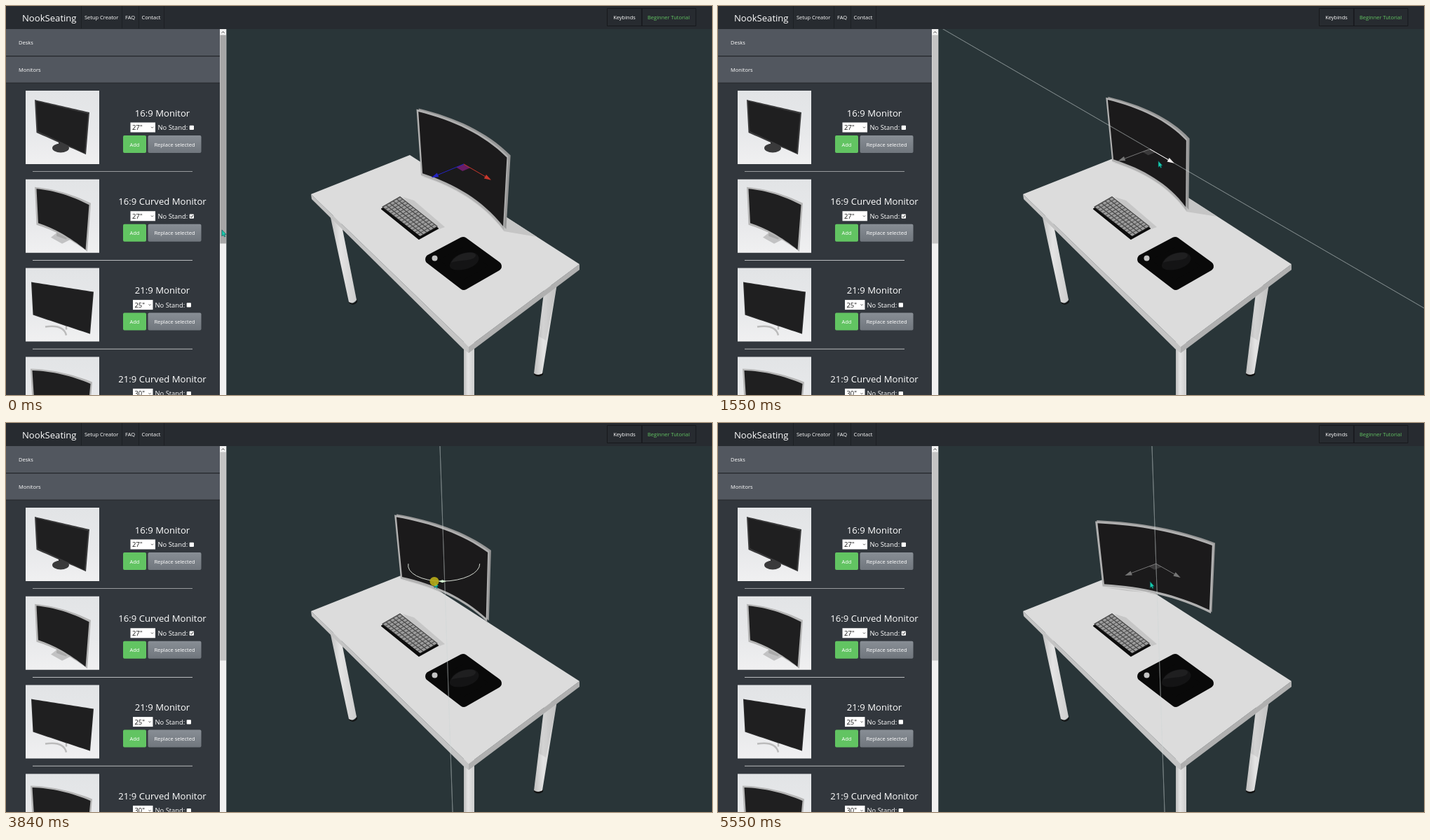
Write an HTML page that moves like this. It is 1007 px wide and 556 px high and loops after 6900 ms.

```html
<!DOCTYPE html>
<html lang="en">
<head>
<meta charset="utf-8">
<title>Desk planner</title>
<style>
html, body { margin: 0; width: 100%; height: 100%; overflow: hidden; background: #293538; }
svg { display: block; width: 1007px; height: 556px; font: 7.5px 'Open Sans', 'Noto Sans', sans-serif; fill: #fff; }
.mid { text-anchor: middle; }
.title { font-size: 13.1px; }
.field { font-size: 9.4px; }
</style>
</head>
<body>
<svg viewBox="0 0 1007 556">
  <defs>
    <linearGradient id="grey" x2="0" y2="1"><stop stop-color="#888e95"/><stop offset="1" stop-color="#70767d"/></linearGradient>
    <linearGradient id="leg"><stop stop-color="#bdbdbd"/><stop offset=".4" stop-color="#e4e4e4"/><stop offset="1" stop-color="#cdcdcd"/></linearGradient>
    <linearGradient id="photo" x2="0" y2="1"><stop stop-color="#e2e4e6"/><stop offset=".6" stop-color="#e8e9eb"/><stop offset="1" stop-color="#f0f0f1"/></linearGradient>
    <clipPath id="deskTop"><path d="M435,269 576,213 818,369 660,487Z"/></clipPath>
  </defs>

  <!-- 3D view -->
  <path fill="#293538" d="M314 33h693v523H314z"/>
  <path fill="#111" d="M489,420q6,10 12,0v3q-6,7-12,1zM753,523q6,7 13,1v3q-7,5-13,0z"/>
  <path fill="url(#leg)" d="M462,298 477,304 500,420q-5,7-11,3Z"/>
  <path fill="url(#leg)" d="M768,402 786,397 765,525q-6,4-12,0Z"/>
  <path fill="#8e8e8e" opacity=".2" d="M768,402 786,397 770,478 760,472Z"/>
  <path fill="url(#leg)" d="M653 480h15v76h-15z"/>
  <path fill="#c4c4c4" d="M435,269 660,487 660,496 652,490 436,276Z"/>
  <path fill="#b0b0b0" d="M660,487 818,369v8L668,490l-8,6Z"/>
  <path fill="#dcdcdc" d="M435,269 576,213 818,369 660,487Z"/>
  <path id="shadow" fill="#c5c5c5" clip-path="url(#deskTop)"/>

  <path fill="#c6c6c6" d="M566,273 582,278 626,316 612,321Z"/>
  <path fill="#0d0d0d" stroke="#0d0d0d" stroke-width="2" stroke-linejoin="round" d="M536,290 561,275 616,318 589,333Z"/>
  <path fill="#4b4b4b" d="M536,287 562,272 616,315 591,329Z"/>
  <g id="keys" fill="#9d9d9d" transform="matrix(53 42 -25 14.5 562 273)"/>

  <path fill="#090909" stroke="#090909" stroke-width="14" stroke-linejoin="round" d="M605,362 652,337 700,372 653,399Z"/>
  <circle cx="611.5" cy="360.5" r="4" fill="#c4c4c4"/>
  <path fill="#141415" d="M633,372C633,361 648,351 664,352C674,353 678,361 671,368C662,378 635,381 633,372Z"/>
  <path fill="#1f1f20" d="M635,367C639,358 651,352 664,352.5C671,353 672,358 666,361C656,365 643,363 635,367Z"/>

  <path id="back" fill="#969696"/><path id="front" fill="#b0b0b0"/><path id="screen" fill="#1b1a1b"/>
  <path id="axis" stroke="#cfd6d6" stroke-width=".8" opacity=".5"/>
  <g id="move"><path id="plane"/><g id="zArm"/><g id="xArm"/></g>
  <g id="turn"><path id="ring" fill="none"/><path id="knob" d="M-5.5,0 0,-2 5.5,0 0,2Z"/></g>

  <!-- Side panel -->
  <path fill="#32373d" d="M0 33h305v523H0z"/>
  <path fill="#52575f" d="M0 33h305v38H0zM0 72h305v38H0z"/>
  <path fill="#24272b" d="M0 71h305v1.2H0zM0 109.6h305v.8H0z"/>
  <text x="18" y="55">Desks</text><text x="18" y="94">Monitors</text>
  <g id="list"></g>
  <path fill="#f1f1f1" d="M305 33h9.3v523h-9.3z"/>
  <path id="thumb" d="M305.4 41.5h8.5v298h-8.5z"/>
  <path fill="none" stroke="#444" d="M307.6 38.6l2-2 2 2"/>

  <!-- Top bar -->
  <path fill="#272b30" d="M0 0h1007v33H0z"/>
  <path stroke="#1d2024" d="M107.5 0v32M165.5 0v32M189.5 0v32M225.5 0v32"/>
  <path fill="none" stroke="#17191c" d="M857.5 3.5h49.5v25h-49.5zM907 3.5h77v25h-77z"/>
  <text x="23" y="21.5" class="title">NookSeating</text>
  <text x="112" y="19">Setup Creator</text><text x="170" y="19">FAQ</text><text x="193.5" y="19">Contact</text>
  <text x="882" y="19" class="mid">Keybinds</text>
  <text x="945" y="19" class="mid" fill="#62c462">Beginner Tutorial</text>

  <g id="cursor">
    <path fill="#17cbae" stroke="#0b4a48" stroke-width=".6" d="M0,0V9L2,7.3 3.5,10 4.9,9.4 3.5,6.8 6,6.5Z"/>
    <circle id="press" r="6.5" fill="#b9ac18" opacity=".9"/>
  </g>
</svg>
<script>
const $ = id => document.getElementById(id);
const set = (id, attrs) => { for (const k in attrs) $(id).setAttribute(k, attrs[k]); };
const show = (id, on) => set(id, { display: on ? 'inline' : 'none' });
const ramp = (t, a, b) => Math.min(1, Math.max(0, (t - a) / (b - a)));
const within = (t, a, b) => t >= a && t < b;
const span = (from, to, n = 16) => Array.from({ length: n + 1 }, (_, i) => from + (to - from) * i / n);
const poly = points => 'M' + points.map(p => p.map(v => v.toFixed(2))).join(' ') + 'Z';

// Closed band between an upper and a lower curve
const band = (xs, upper, lower) => poly([...xs.map(upper), ...xs.toReversed().map(lower)]);

// Camera looking down on the desk; heights count from the desk top, in cm
const rad = deg => deg * Math.PI / 180;
const focal = 654, pitch = rad(35.2), eye = 122.7, deskAngle = 49.5;
function project(right, height, ahead) {
  const up = height - eye, s = Math.sin(pitch), c = Math.cos(pitch), k = focal / (ahead * c - up * s);
  return [660 + right * k, 294 - (up * c + ahead * s) * k];
}

// Point relative to an object standing at [right, ahead], turned by deg
function local([right, ahead], deg, x, y, z) {
  const s = Math.sin(rad(deg)), c = Math.cos(rad(deg));
  return project(right + x * c - z * s, y, ahead - x * s - z * c);
}

// Product list: thumbnails are slanted panels whose right side is nearer
const products = [
  { name: '16:9 Monitor', size: 27, frame: '#3a3a3b', edge: 2, wide: 1,
    left: 13, right: 91, top: 13, drop: 18, tall: 47, bulge: 0,
    stand: '<path fill="#333" d="M47 70h8v13h-8z"/><ellipse cx="50" cy="82" rx="12" ry="6.5" fill="#3a3a3b"/>' },
  { name: '16:9 Curved Monitor', size: 27, frame: '#b5b5b5', edge: 2.5, wide: 1, checked: 1,
    left: 13, right: 93, top: 11, drop: 23, tall: 54, bulge: 4,
    stand: '<path fill="#c2c2c3" d="M36 83l10-8 22 9-16 8z"/><path fill="#aaa" d="M45 72l16 6-3 8-14-5z"/>' },
  { name: '21:9 Monitor', size: 25, frame: '#2c2c2d', edge: 1,
    left: 8, right: 97, top: 20, drop: 14, tall: 47, bulge: 0,
    stand: '<path fill="none" stroke="#bbb" stroke-width="2.5" d="M28 84q26-4 30 12M58 78v10"/>' },
  { name: '21:9 Curved Monitor', size: 30, frame: '#b5b5b5', edge: 2.5,
    left: 7, right: 95, top: 17, drop: 19, tall: 45, bulge: 4, stand: '' }
];
function thumbPanel(p, inset) {
  const rise = u => p.top + p.drop * u - p.bulge * 4 * u * (1 - u);
  const x = (u, taper) => p.left + inset + taper + (p.right - p.left - 2 * inset - 3 * taper) * u;
  return band(span(0, 1), u => [x(u, 0), rise(u) + inset],
    u => [x(u, 2.5), rise(u) + p.tall * (1 + .28 * u) - inset]);
}
$('list').innerHTML = products.map((p, i) => {
  const sx = p.wide ? 177.5 : 181, sw = p.wide ? 35.5 : 28.5, label = p.wide ? 216.5 : 212.5;
  return `<g transform="translate(0 ${121 + i * 126.8})">
    <path fill="url(#photo)" d="M28 0h105v105H28z"/>
    <g transform="translate(28)">${p.stand}
      <path fill="${p.frame}" d="${thumbPanel(p, 0)}"/><path fill="#1f1f20" d="${thumbPanel(p, p.edge)}"/></g>
    <path fill="#b9bbbd" d="M38 115.2h228v.9H38z"/>
    <text x="223" y="36.7" class="mid title">${p.name}</text>
    <path fill="#fff" d="M${sx} 45.5h${sw}v14h-${sw}z"/>
    <text x="${sx + 2.5}" y="56" class="field" fill="#111">${p.size}"</text>
    <path fill="none" stroke="#333" stroke-width=".8" d="M${sx + sw - 6} 51.8l1.5 1.5 1.5-1.5"/>
    <text x="${label}" y="56" class="field">No Stand:</text>
    <rect x="${label + 45.2}" y="49.7" width="6.3" height="6.3" rx="1"/>
    ${p.checked ? '<path fill="none" stroke="#222" d="M263 52.8l1.5 1.6 2.6-3.3"/>' : ''}
    <rect x="167" y="64" width="33" height="25" rx="2" fill="#62c462"/>
    <rect x="202.5" y="64" width="76" height="25" rx="2" fill="url(#grey)"/>
    <text x="183.5" y="79.5" class="mid">Add</text><text x="240.5" y="79.5" class="mid">Replace selected</text>
  </g>`;
}).join('');

$('keys').innerHTML = span(0, 69, 69).map(i =>
  `<rect x="${i % 14 / 14 + .01}" y="${Math.floor(i / 14) / 5 + .02}" width=".056" height=".15"/>`).join('');

// Pointer moves relative to the gizmo: start, end, then offset reached
const pointerMoves = [
  [30, 570, 30, 17], [1480, 1550, 12, 17], [1610, 1790, -36, 18], [2590, 2880, -25, 28],
  [3060, 3290, -16.5, 25], [3720, 4130, -7.5, 26], [5010, 5140, -8.5, 25.5]
];
function pointerOffset(t) {
  let x = -345, y = 94;
  for (const [a, b, dx, dy] of pointerMoves) {
    const f = ramp(t, a, b);
    x += (dx - x) * f;
    y += (dy - y) * f;
  }
  return [x, y];
}

function drawArm(id, [x, y], tip, color, opacity) {
  const dx = tip[0] - x, dy = tip[1] - y, n = Math.hypot(dx, dy), ux = dx / n, uy = dy / n;
  const bx = tip[0] - ux * 10, by = tip[1] - uy * 10, w = 3.2;
  $(id).innerHTML = `<path stroke="${color}" d="M${x},${y} ${bx},${by}"/>
    <path fill="${color}" d="${poly([tip, [bx - uy * w, by + ux * w], [bx + uy * w, by - ux * w]])}"/>`;
  set(id, { opacity });
}

function drawMonitor(spot, deg) {
  const half = 31, bend = x => 5.2 * (x / half) ** 2 - 2;
  const at = (y, depth = 0) => x => local(spot, deg, x, y, bend(x) - depth);
  const face = (w, top, bottom, depth) => band(span(-w, w), at(top, depth), at(bottom, depth));
  set('back', { d: face(half, 37, .5, 1.3) });
  set('front', { d: face(half, 37, .5) });
  set('screen', { d: face(half - 1, 36, 2) });
  const cast = [spot[0] + 14, spot[1] - 4];
  set('shadow', { d: band(span(-half, half), at(0), x => local(cast, deg, x, 0, bend(x))) });
}

function drawGizmo(t, spot) {
  const height = 19.2, reach = 18.5;
  const at = (x, z, y = 0) => local(spot, deskAngle, x, height + y, z);
  const around = a => local(spot, 0, 17.5 * Math.cos(a), height, 17.5 * Math.sin(a));
  const hover = within(t, 530, 1580) ? 'x' : within(t, 1730, 2680) ? 'z' : t >= 3200 ? 'y' : '';
  const rotating = within(t, 3060, 5550), centre = at(0, 0);

  show('axis', hover);
  const line = { x: d => at(d, 0), y: d => at(0, 0, d), z: d => at(0, d) }[hover];
  if (line) set('axis', { d: poly([line(-400), line(150)]) });

  show('move', !rotating);
  show('turn', rotating);
  const paint = (axis, color) => !hover ? [color, 1] : hover === axis ? ['#f2eeee', 1] : ['#a8a8a8', .65];
  drawArm('zArm', centre, at(0, reach), ...paint('z', '#2424c4'));
  drawArm('xArm', centre, at(reach, 0), ...paint('x', '#c8372c'));
  const side = 4.5;
  set('plane', { d: poly([centre, at(side, 0), at(side, side), at(0, side)]),
    fill: hover ? '#777' : '#8a1f86', opacity: hover ? .35 : .7 });
  set('ring', { d: 'M' + span(0, Math.PI).map(around).join(' '), stroke: hover ? '#d5dad2' : '#35b435' });
  set('knob', { transform: `translate(${around(Math.PI / 2)})`, fill: hover ? '#d4f5d2' : '#35b435' });
  return centre;
}

function draw(now) {
  const t = now % 6900;
  const x = 19.6 * (1 - ramp(t, 910, 1480)), z = 3.8 * (1 - ramp(t, 1960, 2290));
  const s = Math.sin(rad(deskAngle)), c = Math.cos(rad(deskAngle));
  const spot = [-12.1 + x * c - z * s, 202.1 - x * s - z * c];
  drawMonitor(spot, deskAngle - 24.5 * ramp(t, 3720, 4130));

  const [gx, gy] = drawGizmo(t, spot), [dx, dy] = pointerOffset(t);
  set('cursor', { transform: `translate(${gx + dx} ${gy + dy})` });
  show('press', within(t, 900, 1510) || within(t, 1960, 2420) || within(t, 3720, 4650));
  set('thumb', { fill: gx + dx < 314 ? '#a6a6a6' : '#c4c4c4' });
  requestAnimationFrame(draw);
}
requestAnimationFrame(draw);
</script>
</body>
</html>
```
